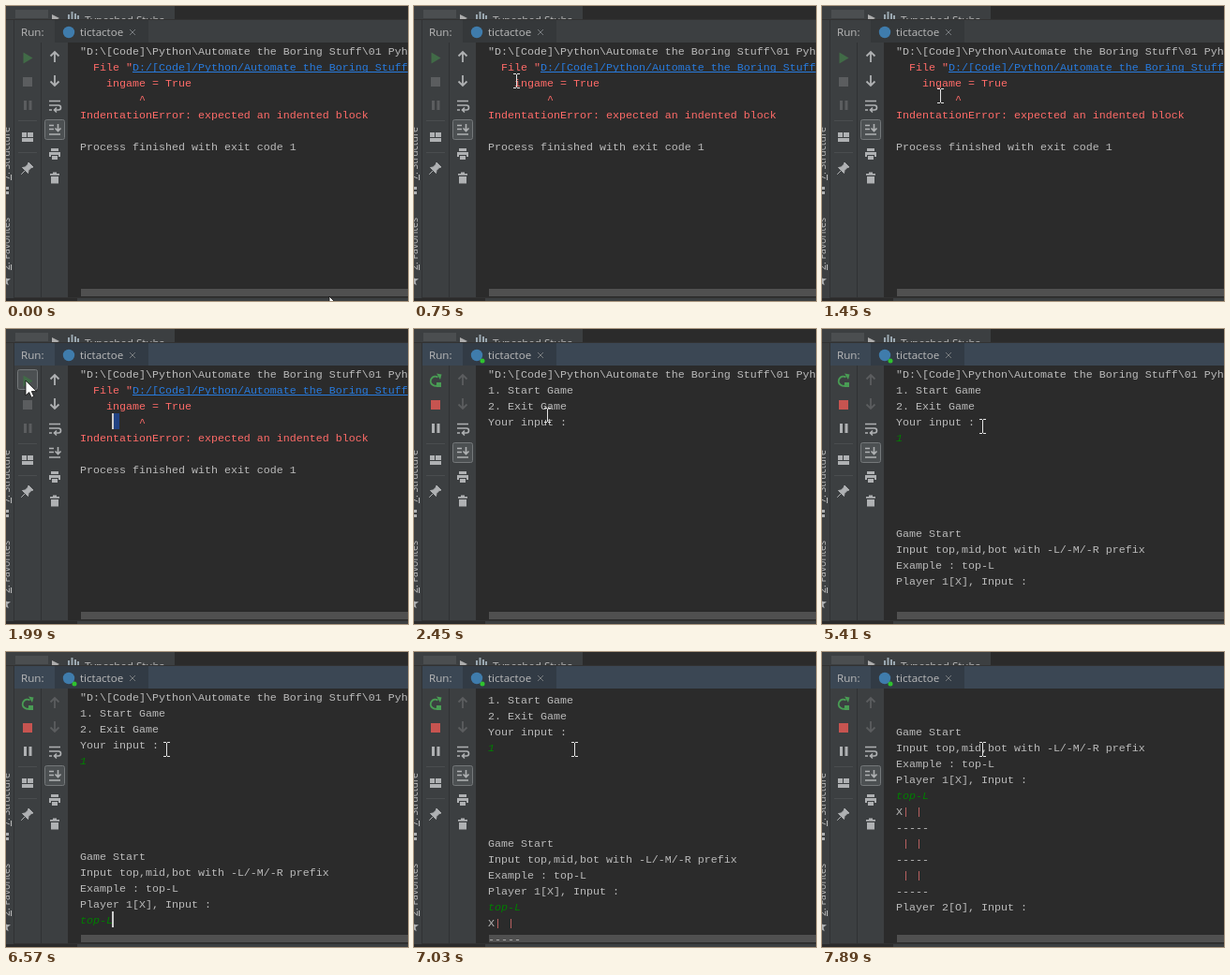
Write an HTML page that moves like this. It is 429 by 315 pixels and loops after 8000 ms.

```html
<!DOCTYPE html>
<html lang="en">
<head>
<meta charset="utf-8">
<title>Run console</title>
<style>
  html, body { margin: 0; width: 100%; height: 100%; overflow: hidden; background: #2b2b2b; }
  #stage { position: relative; width: 429px; height: 315px; overflow: hidden; background: #2b2b2b; }
  svg { position: absolute; left: 0; top: 0; }
  #view { position: absolute; left: 66px; top: 41px; width: 363px; height: 270px; overflow: hidden; }
  #page { position: absolute; left: 13px; top: -2px; }
  #text { position: absolute; left: 0; top: 2px; margin: 0; white-space: pre;
    font: 11.667px/17px "Liberation Mono", monospace; color: #bbb; }
  #caret, #sel { position: absolute; height: 17px; }
  #caret { width: 2px; background: #ccc; }
  #sel { left: 34px; top: 51px; width: 8px; background: #214283; }
  .err { color: #ff6b68; }
  .link { color: #287bde; text-decoration: underline 1px; text-decoration-skip-ink: none; text-underline-offset: 1px; }
  .in { color: #007f00; font-style: italic; }
  .bar { color: #bd6262; }
  .ui { font: 11.6px "Open Sans", sans-serif; fill: #bbb; }
  .side { font: 10.5px "Open Sans", sans-serif; fill: #bbb; }
  .line { fill: none; stroke: #afb1b3; stroke-width: 1.6; }
</style>
</head>
<body>
<div id="stage">
  <svg width="429" height="315">
    <!-- project tree remainder -->
    <rect width="180" height="15" fill="#3c3f41"/>
    <rect x="180" width="249" height="15" fill="#2b2b2b"/>
    <path d="M49 9 L57 13 L49 17Z" fill="#adadad"/>
    <path d="M67 9v5M70.5 6v8M74 8v6M77 10v4" stroke="#9aa7b0" stroke-width="2"/>
    <text x="84" y="18.5" class="ui">Typeshed Stubs</text>
    <rect x="10" y="4" width="35" height="9" fill="#fff" opacity=".08"/>
    <rect y="14" width="429" height="1" fill="#323232"/>

    <!-- header -->
    <rect id="head" x="9" y="15" width="420" height="24"/>
    <rect id="tab" x="52" y="15" width="100" height="24"/>
    <text x="16" y="32" class="ui">Run:</text>
    <circle cx="67" cy="28" r="6.2" fill="#3f7cac"/>
    <circle id="live" cx="73" cy="34" r="2.5" fill="#2fc22f"/>
    <text x="79" y="32" class="ui">tictactoe</text>
    <path d="M132 25l6 6m0-6l-6 6" stroke="#777b7e"/>

    <!-- side strip and toolbars -->
    <rect y="15" width="8" height="300" fill="#3c3f41"/>
    <rect x="9" y="39" width="57" height="272" fill="#3c3f41"/>
    <path d="M8.5 15V315M37.5 39V311" stroke="#303234"/>
    <text class="side" transform="translate(4 186) rotate(-90)"><tspan text-decoration="underline">7</tspan>: Structure</text>
    <text class="side" transform="translate(4 282) rotate(-90)"><tspan text-decoration="underline">2</tspan>: Favorites</text>
    <path d="M0 193h3v3h-3zM0 198h3v3h-3z" fill="#afb1b3"/>
    <path d="M-1 287l1.5 4 4.500 .3-3.500 2.700 1.200 4.200-3.700-2.400z" fill="#afb1b3"/>

    <rect id="hover" x="12.500" y="43.500" width="21" height="21" rx="2" fill="#4c5052" stroke="#74787a"/>
    <path id="play" d="M18.500 49.500L28.500 55.500L18.500 61.500Z" fill="#416b47"/>
    <g id="rerun">
      <path d="M26.500 59a5 5 0 1 1-1-7.500" fill="none" stroke="#499c54" stroke-width="2"/>
      <path d="M24 47.500l5.500 1-1.500 5.500z" fill="#499c54"/>
      <path d="M24 57h5v5h-5z" fill="#499c54"/>
    </g>
    <rect id="stop" x="18" y="76" width="10" height="10"/>
    <path id="pause" d="M19 101h3v10h-3zM24.500 101h3v10h-3z"/>
    <path d="M13 122.500h20M13 156.500h20" stroke="#4a4d4f"/>
    <path d="M17 135h5v5h-5zM23 135h6v5h-6zM17 141h12v4h-12z" fill="#afb1b3"/>
    <path d="M24 167l5 5-2 .5-3 3-.5 3-3-3-4 4 4-4-3-3 3-.5 3-3z" fill="#afb1b3" stroke="#afb1b3"/>

    <g id="arrows" fill="none" stroke-width="1.8">
      <path d="M52 60V49M47.500 53.500L52 49l4.500 4.500"/>
      <path d="M52 74V85M47.500 80.500L52 85l4.500-4.500"/>
    </g>
    <path class="line" d="M46 101.500h12M46 106h10a2.500 2.500 0 0 1 0 5h-4M54 108.500l-2.500 2.500 2.500 2.500M46 111h3"/>
    <rect id="toggle" x="41.500" y="121.500" width="21" height="21" rx="2" fill="#4c5052" stroke="#74787a"/>
    <path class="line" d="M46 127.500h5M46 131.500h5M46 137h12M55.500 126v7M52.500 130.500l3 3 3-3"/>
    <path d="M48 152h8v3h-8zM46 156h12v5h-2v-2h-8v2h-2zM49 160h6v4h-6z" fill="#afb1b3"/>
    <path d="M47 179h10v1.800h-10zM50 177.500h4v1.500h-4zM48 182h8v7.500h-8z" fill="#afb1b3"/>

    <!-- bottom edge -->
    <rect x="9" y="311" width="420" height="1" fill="#323232"/>
    <rect x="76" y="312" width="353" height="3" fill="#3c3f41"/>
    <rect y="312" width="76" height="3" fill="#2b2b2b"/>
  </svg>

  <div id="view"><div id="page">
    <div id="sel"></div>
    <pre id="text"></pre>
    <div id="caret"></div>
  </div></div>

  <svg width="429" height="315">
    <rect x="80" y="302" width="349" height="8" fill="#a6a6a6" opacity=".3"/>
    <path id="arrow" d="M0 1V17L3.700 13.600L6.200 19.200L8.800 18L6.300 12.600H11.500Z" fill="#fff" stroke="#111" stroke-width=".8"/>
    <path id="beam" d="M-3 -7.500H0M1 -7.500H4M.5 -7V7M-3 7.500H0M1 7.500H4" fill="none" stroke="#e4e4e4"/>
  </svg>
</div>
<script>
const LOOP = 8000, STEP = 77, ROW = 17, COL = 7;
const $ = id => document.getElementById(id);
const span = (cls, s) => `<span class="${cls}">${s}</span>`;

const PATH = '"D:\\[Code]\\Python\\Automate the Boring Stuff\\01 Pyh';
const ERROR = [
  span('err', '  File "') + span('link', 'D:/[Code]/Python/Automate the Boring Stuff'),
  span('err', '    ingame = True'),
  span('err', '         ^'),
  span('err', 'IndentationError: expected an indented block'),
  '', 'Process finished with exit code 1'
];
const MENU = ['1. Start Game', '2. Exit Game', 'Your input : '];
const INTRO = ['', '', '', '', '', 'Game Start',
  'Input top,mid,bot with -L/-M/-R prefix', 'Example : top-L', 'Player 1[X], Input : '];
const BOARD = ['X', ' ', ' '].flatMap(c => [c + span('bar', '|') + ' ' + span('bar', '|'), '-----']);

// time, x, y
const MOUSE = [[0, 345, 309], [69, 345, 309], [300, 262, 190], [530, 130, 84], [760, 100, 78],
  [905, 100, 78], [1230, 118, 92], [1380, 126, 96], [1540, 117, 97], [1617, 84, 88], [1694, 50, 70],
  [1848, 27, 58], [1925, 21, 54], [2150, 21, 54], [2387, 142, 92], [2670, 142, 92],
  [2926, 171, 104], [LOOP, 171, 104]];
// time, column, row (no cell: hidden)
const CARET = [[0], [1606, 5, 3], [2220], [3000, 13, 3], [3380, 1, 4], [3610, 0, 5], [3780, 0, 14],
  [4400], [4860, 0, 14], [5410], [5490, 1, 14], [5790, 0, 14], [5970, 1, 14], [6040, 2, 14],
  [6110, 3, 14], [6270, 4, 14], [6570, 5, 14], [6800, 0, 15], [7030, 0, 22], [7890]];
const TYPED = [[0, ''], [5490, 't'], [5790, ''], [5970, 't'], [6040, 'to'], [6110, 'top'],
  [6270, 'top-'], [6570, 'top-L']];
const SCROLL = [[0, 0], [6800, 14], [7110, 133]];

const at = (table, t) => table.findLast(row => row[0] <= t);
const show = (id, on) => { $(id).style.display = on ? '' : 'none'; };
const fill = (id, color) => $(id).setAttribute('fill', color);

function consoleText(t) {
  if (t < 2220) return [PATH, ...ERROR];
  const out = [PATH];
  if (t >= 2370) out.push(...MENU);
  if (t >= 3380) out.push(span('in', '1'));
  if (t >= 3780) out.push(...INTRO, span('in', at(TYPED, t)[1]));
  if (t >= 7030) out.push(...BOARD, 'Player 2[O], Input : ');
  return out;
}

function mouseAt(t) {
  const q = Math.floor(t / STEP) * STEP;
  const i = MOUSE.findIndex(p => p[0] > q);
  const [t0, x0, y0] = MOUSE[i - 1], [t1, x1, y1] = MOUSE[i];
  const k = (q - t0) / (t1 - t0);
  return [Math.round(x0 + (x1 - x0) * k), Math.round(y0 + (y1 - y0) * k)];
}

let last = '';
function draw(t) {
  const html = consoleText(t).join('\n');
  if (html !== last) $('text').innerHTML = last = html;
  $('page').style.transform = `translateY(${-at(SCROLL, t)[1]}px)`;

  const [, col, row] = at(CARET, t);
  show('caret', row !== undefined);
  if (row !== undefined) {
    $('caret').style.left = Math.max(0, col * COL - 1) + 'px';
    $('caret').style.top = row * ROW + 'px';
  }
  show('sel', t >= 1606 && t < 2220);

  const focus = t >= 1530, running = t >= 2220;
  fill('head', focus ? '#3b4754' : '#3c3f41');
  fill('tab', focus ? '#323b45' : '#35383a');
  show('live', running);
  show('rerun', running);
  show('play', !running);
  fill('stop', running ? '#c75450' : '#5b5d5f');
  fill('pause', running ? '#afb1b3' : '#5b5d5f');
  $('arrows').setAttribute('stroke', running ? '#5b5d5f' : '#afb1b3');
  show('toggle', !(t >= 1760 && t < 2220) && !(t >= 3000 && t < 3930));

  const [x, y] = mouseAt(t);
  const arrow = x < 66 || y > 302;
  show('hover', x < 34 && y < 65);
  show('arrow', arrow);
  show('beam', !arrow);
  $(arrow ? 'arrow' : 'beam').setAttribute('transform', `translate(${x} ${y})`);
}

const start = performance.now();
function tick() {
  draw((performance.now() - start) % LOOP);
  requestAnimationFrame(tick);
}
tick();
</script>
</body>
</html>
```
